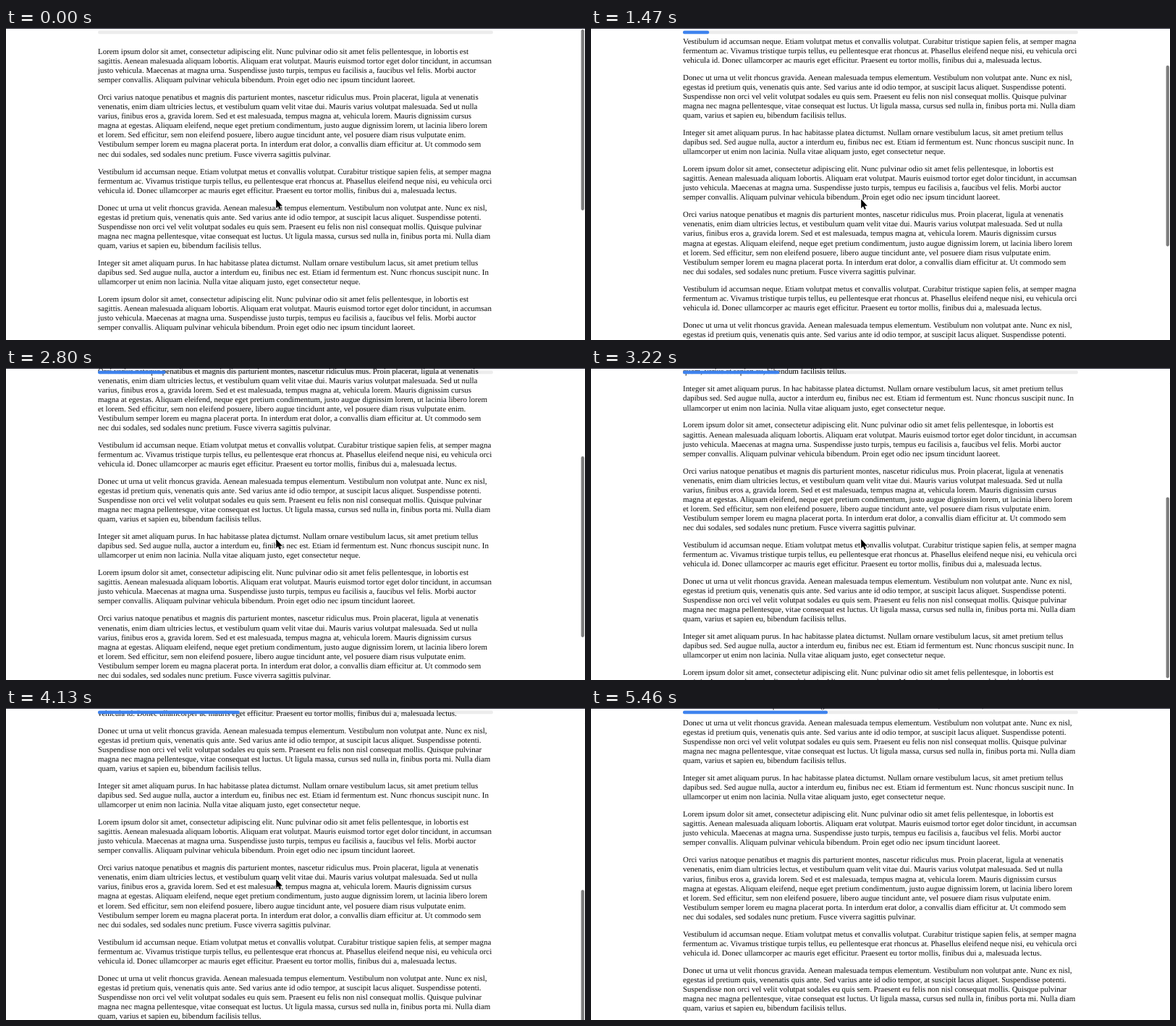
An HTML page that plays this animation: 800x431 px, repeating every 5.53 s.

```html
<!DOCTYPE html>
<html lang="la">
<head>
<meta charset="utf-8">
<title>Scroll progress</title>
<style>
html, body { margin: 0; width: 100%; height: 100%; overflow: hidden; background: #fff; }
svg { display: block; width: 800px; height: 431px; }
text {
  font: 10.935px "Liberation Serif", Times, serif;
  fill: #0a0a0a;
  text-rendering: geometricPrecision;
  white-space: pre;
}
</style>
</head>
<body>
<svg viewBox="0 0 800 431">
  <rect x="127" y="3.8" width="546" height="4.4" rx="2.2" fill="#ececec"/>
  <g id="page"></g>
  <rect id="bar" x="127" y="3.8" height="4.4" rx="2" fill="#3f83ee"/>
  <rect width="800" height="1" fill="#1e1e2c"/>
  <rect id="thumb" x="794.6" width="4.3" height="250" rx="2.15" fill="#7d7d7d"/>
  <path id="cursor" transform="translate(373.2 236.6) scale(1.08)" d="M0 0V11.4L2.6 9 4.4 13 6.2 12.3 4.5 8.4H8Z"
    fill="#000" stroke="#fff" stroke-width="1" paint-order="stroke"/>
</svg>
<script>
const PARAGRAPHS = `Lorem ipsum dolor sit amet, consectetur adipiscing elit. Nunc pulvinar odio sit amet felis pellentesque, in lobortis est
sagittis. Aenean malesuada aliquam lobortis. Aliquam erat volutpat. Mauris euismod tortor eget dolor tincidunt, in accumsan
justo vehicula. Maecenas at magna urna. Suspendisse justo turpis, tempus eu facilisis a, faucibus vel felis. Morbi auctor
semper convallis. Aliquam pulvinar vehicula bibendum. Proin eget odio nec ipsum tincidunt laoreet.

Orci varius natoque penatibus et magnis dis parturient montes, nascetur ridiculus mus. Proin placerat, ligula at venenatis
venenatis, enim diam ultricies lectus, et vestibulum quam velit vitae dui. Mauris varius volutpat malesuada. Sed ut nulla
varius, finibus eros a, gravida lorem. Sed et est malesuada, tempus magna at, vehicula lorem. Mauris dignissim cursus
magna at egestas. Aliquam eleifend, neque eget pretium condimentum, justo augue dignissim lorem, ut lacinia libero lorem
et lorem. Sed efficitur, sem non eleifend posuere, libero augue tincidunt ante, vel posuere diam risus vulputate enim.
Vestibulum semper lorem eu magna placerat porta. In interdum erat dolor, a convallis diam efficitur at. Ut commodo sem
nec dui sodales, sed sodales nunc pretium. Fusce viverra sagittis pulvinar.

Vestibulum id accumsan neque. Etiam volutpat metus et convallis volutpat. Curabitur tristique sapien felis, at semper magna
fermentum ac. Vivamus tristique turpis tellus, eu pellentesque erat rhoncus at. Phasellus eleifend neque nisi, eu vehicula orci
vehicula id. Donec ullamcorper ac mauris eget efficitur. Praesent eu tortor mollis, finibus dui a, malesuada lectus.

Donec ut urna ut velit rhoncus gravida. Aenean malesuada tempus elementum. Vestibulum non volutpat ante. Nunc ex nisl,
egestas id pretium quis, venenatis quis ante. Sed varius ante id odio tempor, at suscipit lacus aliquet. Suspendisse potenti.
Suspendisse non orci vel velit volutpat sodales eu quis sem. Praesent eu felis non nisl consequat mollis. Quisque pulvinar
magna nec magna pellentesque, vitae consequat est luctus. Ut ligula massa, cursus sed nulla in, finibus porta mi. Nulla diam
quam, varius et sapien eu, bibendum facilisis tellus.

Integer sit amet aliquam purus. In hac habitasse platea dictumst. Nullam ornare vestibulum lacus, sit amet pretium tellus
dapibus sed. Sed augue nulla, auctor a interdum eu, finibus nec est. Etiam id fermentum est. Nunc rhoncus suscipit nunc. In
ullamcorper ut enim non lacinia. Nulla vitae aliquam justo, eget consectetur neque.`.split("\n\n").map(p => p.split("\n"));

const LOOP = 5530, STEP = 70;
const LINE = 13.06, GAP = 10.92, FIRST_BASELINE = 36, REPEATS = 4;
const BAR_RATIO = 0.2194, BAR_LAG = 90, THUMB_RATIO = 0.2768;
const FLICKS = [
  { start: 700, distance: 238, tau: 283 },
  { start: 2187, distance: 207, tau: 129 },
  { start: 2820, distance: 240, tau: 132 },
  { start: 3510, distance: 226.5, tau: 129 }
];

const [page, bar, thumb, cursor] =
  ["page", "bar", "thumb", "cursor"].map(id => document.getElementById(id));

function layOutPage() {
  let y = FIRST_BASELINE;
  for (let i = 0; i < REPEATS; i++) {
    for (const lines of PARAGRAPHS) {
      for (const line of lines) {
        const text = document.createElementNS("http://www.w3.org/2000/svg", "text");
        text.setAttribute("x", 127);
        text.setAttribute("y", y.toFixed(2));
        text.textContent = line;
        page.append(text);
        y += LINE;
      }
      y += GAP;
    }
  }
}

// Each flick accelerates briefly, then coasts to a stop.
function scrollAt(t) {
  return FLICKS.reduce((sum, { start, distance, tau }) => {
    const u = Math.max(0, t - start) / tau;
    return sum + distance * (1 - (1 + u) * Math.exp(-u));
  }, 0);
}

function render(t) {
  const scroll = scrollAt(t);
  page.setAttribute("transform", `translate(0 ${-scroll.toFixed(2)})`);
  bar.setAttribute("width", scrollAt(t - BAR_LAG) * BAR_RATIO);
  thumb.setAttribute("y", 2 + scroll * THUMB_RATIO);
  thumb.setAttribute("opacity", Math.min(1, Math.max(0, (5180 - t) / 250)));
  cursor.setAttribute("visibility", t < 5220 ? "visible" : "hidden");
}

layOutPage();
render(0);
const began = performance.now();
(function tick() {
  const t = (performance.now() - began) % LOOP;
  render(Math.floor(t / STEP) * STEP);
  requestAnimationFrame(tick);
})();
</script>
</body>
</html>
```
